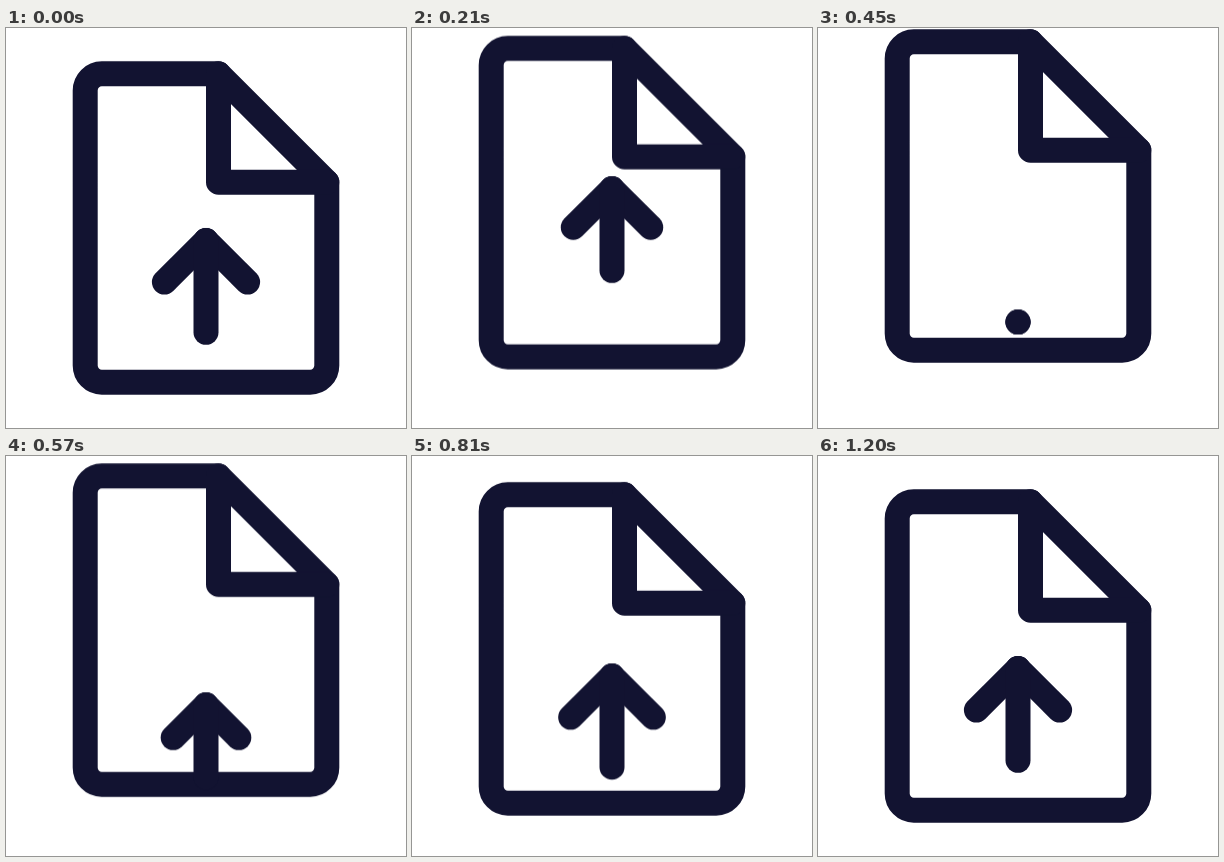
Recreate the animation shown at these times as an HTML page. Size 400 px wide and 400 px high, loop 3.23 s.

```html
<!DOCTYPE html>
<html lang="en">
<head>
<meta charset="utf-8">
<title>File upload</title>
<style>
  html, body { margin: 0; width: 100%; height: 100%; overflow: hidden; background: #fff; }
  svg { display: block; width: 100%; height: 100%; }
  path { fill: none; stroke: #121331; stroke-width: 25; stroke-linecap: round; stroke-linejoin: round; }

  .file, .arrow, .rise, .arm, .shaft { animation: 3230ms linear infinite; }
  .file { animation-name: bob; }
  .arrow { animation-name: travel; }
  .rise { animation-name: rise; }
  .arm, .shaft { stroke-dasharray: 1 3; }
  .arm { animation-name: arm; }
  .shaft { animation-name: shaft; }

  /* Whole file lifts, then settles */
  @keyframes bob {
    0% { transform: translateY(0); animation-timing-function: ease; }
    13.313%, 14.149% { transform: translateY(-32px); animation-timing-function: ease; }
    37.152%, 100% { transform: translateY(0); }
  }
  /* Arrow leaves upwards and re-enters from below */
  @keyframes travel {
    0% { transform: translateY(0); animation-timing-function: cubic-bezier(.46, 0, 1, 1); }
    13.932% { transform: translateY(-100px); animation-timing-function: step-start; }
    13.933% { transform: translateY(64px); }
    14.149% { transform: translateY(64px); animation-timing-function: ease; }
    37.152%, 100% { transform: translateY(0); }
  }
  @keyframes rise {
    0%, 13.932% { transform: translateY(0); }
    13.933% { transform: translateY(50px); animation-timing-function: cubic-bezier(.16, 1, .3, 1); }
    30.65%, 100% { transform: translateY(0); }
  }
  /* Strokes retract towards the tip, then grow back */
  @keyframes arm {
    0% { stroke-dashoffset: 0; animation-timing-function: cubic-bezier(.5, 0, .75, 0); }
    12.91% { stroke-dashoffset: 1.01; }
    13.933% { stroke-dashoffset: 1.01; animation-timing-function: cubic-bezier(.16, 1, .3, 1); }
    30.65%, 100% { stroke-dashoffset: 0; }
  }
  @keyframes shaft {
    0% { stroke-dashoffset: 0; animation-timing-function: cubic-bezier(.5, 0, .75, 0); }
    11.455% { stroke-dashoffset: 1.01; }
    13.933% { stroke-dashoffset: 1.01; animation-timing-function: cubic-bezier(.16, 1, .3, 1); }
    30.65%, 100% { stroke-dashoffset: 0; }
  }
</style>
</head>
<body>
<svg viewBox="0 0 400 400">
  <g class="file">
    <path d="M212.5 45.8H95.8A16.7 16.7 0 0 0 79.2 62.5V337.5A16.7 16.7 0 0 0 95.8 354.2H304.2A16.7 16.7 0 0 0 320.8 337.5V154.2Z"/>
    <path d="M212.5 45.8V154.2H320.8"/>
    <g class="arrow">
      <g class="rise">
        <path class="arm" pathLength="1" d="M200 212.5L158.4 254.1"/>
        <path class="arm" pathLength="1" d="M200 212.5L241.6 254.1"/>
        <path class="shaft" pathLength="1" d="M200 212.5V304.3"/>
      </g>
    </g>
  </g>
</svg>
</body>
</html>
```
